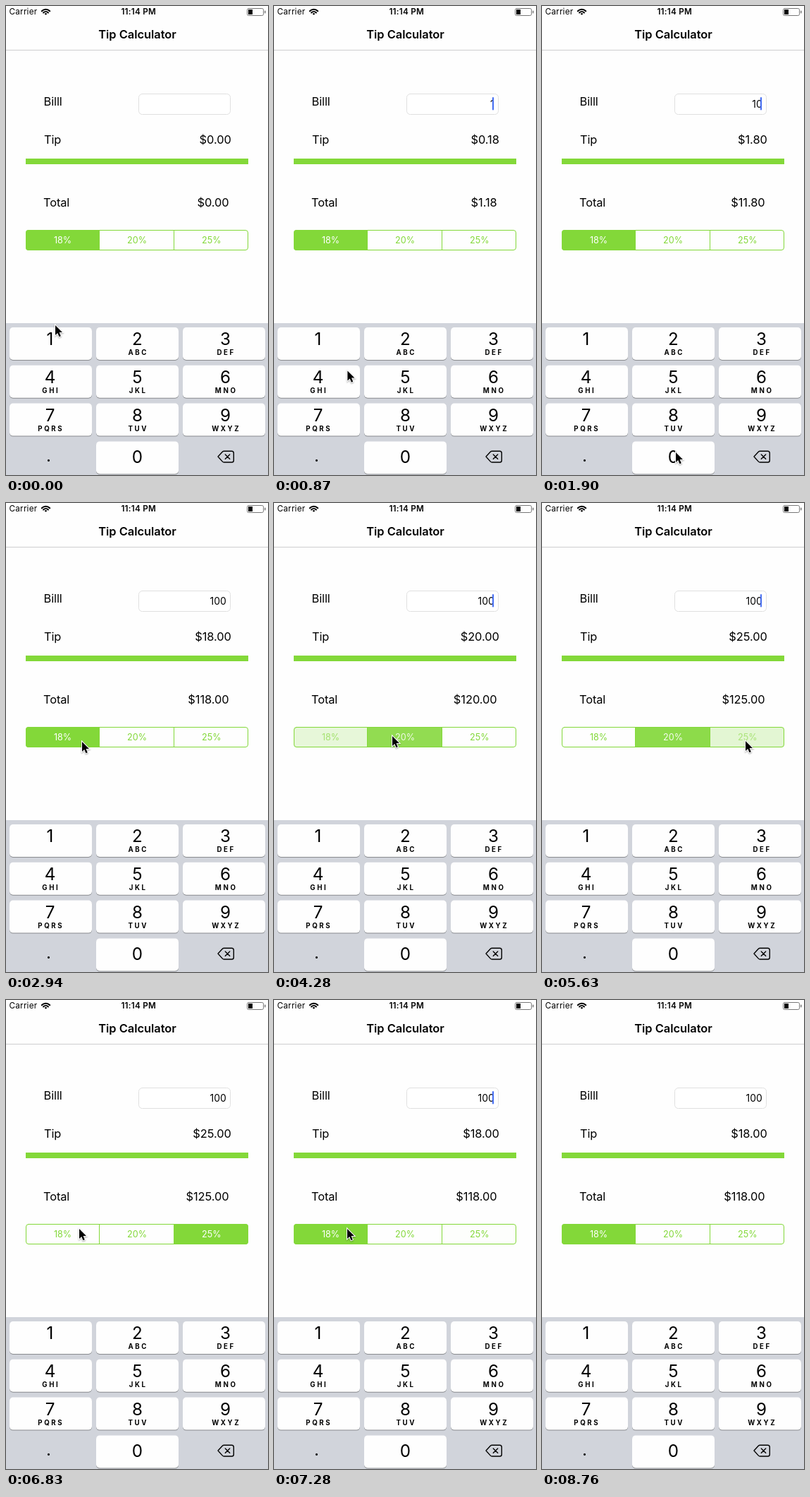
Animation of 372x664 px, one loop 8860 ms. Source, as an HTML page with a canvas:

```html
<!DOCTYPE html>
<html lang="en">
<head>
<meta charset="utf-8">
<title>Tip Calculator</title>
<style>
html, body { margin: 0; width: 100%; height: 100%; overflow: hidden; background: #fefefe; }
canvas { display: block; width: 372px; height: 664px; }
</style>
</head>
<body>
<canvas id="stage"></canvas>
<script>
const W = 372, H = 664, LOOP = 8860;
const GREEN = '#83d839';
const canvas = document.getElementById('stage');
const ctx = canvas.getContext('2d');
const dpr = window.devicePixelRatio || 1;
canvas.width = W * dpr;
canvas.height = H * dpr;

// The screen refreshes in coarse steps.
const STEP = 148.9, LEAD = 45;
const tick = t => Math.max(0, Math.floor((t + LEAD) / STEP) * STEP - LEAD);

const clamp = v => Math.min(1, Math.max(0, v));
const smooth = u => u * u * (3 - 2 * u);

// Pointer stops: time, x, y
const STOPS = [
  [0, 70, 452], [60, 70, 452], [430, 73, 474], [600, 73, 474],
  [1330, 190, 632], [2490, 190, 632], [2930, 108, 338], [3075, 102, 335],
  [3525, 168, 330], [4590, 168, 330], [5320, 289, 337], [5930, 289, 337],
  [6800, 104, 324], [7560, 104, 324], [7995, 128, 481]
];
const POINTER_GONE = 8130;

const TYPED = [[430, '1'], [1740, '10'], [2170, '100']];
const RATES = [18, 20, 25];
const PICKS = [[-1000, 0], [4106, 1], [5572, 2], [7062, 0]];
const PICK_FADE = 190;

function latest(list, t) {
  let i = -1;
  while (i + 1 < list.length && list[i + 1][0] <= t) i++;
  return i;
}

function text(str, x, y, size, o = {}) {
  ctx.font = `${o.weight || 400} ${size}px Inter, "Open Sans", sans-serif`;
  ctx.textAlign = o.align || 'left';
  ctx.letterSpacing = (o.track || 0) + 'px';
  ctx.fillStyle = o.color || '#000';
  ctx.fillText(str, x, y);
}

function rect(x, y, w, h, color) {
  ctx.fillStyle = color;
  ctx.fillRect(x, y, w, h);
}

function round(x, y, w, h, r, fill, stroke) {
  ctx.beginPath();
  ctx.roundRect(x, y, w, h, r);
  if (fill) { ctx.fillStyle = fill; ctx.fill(); }
  if (stroke) { ctx.strokeStyle = stroke; ctx.lineWidth = 1; ctx.stroke(); }
}

function withAlpha(a, draw) {
  if (a <= 0) return;
  ctx.globalAlpha = a;
  draw();
  ctx.globalAlpha = 1;
}

function drawWifi(x, y) {
  const from = -Math.PI * 0.75, to = -Math.PI * 0.25;
  ctx.strokeStyle = ctx.fillStyle = '#000';
  ctx.lineWidth = 2.1;
  for (const r of [8, 4.8]) {
    ctx.beginPath();
    ctx.arc(x, y, r, from, to);
    ctx.stroke();
  }
  ctx.beginPath();
  ctx.moveTo(x, y);
  ctx.arc(x, y, 2.6, from, to);
  ctx.fill();
}

function drawHeader() {
  text('Carrier', 4.6, 12.2, 11.7, { track: 0.2 });
  drawWifi(56.5, 12.8);
  text('11:14 PM', 188.2, 12.2, 11.7, { weight: 600, align: 'center', track: 0.25 });
  round(342.5, 3.5, 23, 10, 2, null, '#777');
  rect(344, 5, 6, 7, '#000');
  round(367, 6.5, 1.5, 4, 0.7, '#777');
  text('Tip Calculator', 186.5, 46, 16.4, { weight: 600, align: 'center' });
  rect(0, 62, W, 1, '#cdcdcf');
}

function caretAlpha(t) {
  if (t < 90) return 0;
  const i = latest(TYPED, t);
  const p = (t - (i < 0 ? 90 : TYPED[i][0] + 20)) % 994;
  if (p > 935) return 1;
  return 1 - clamp((p - 435) / 150);
}

function drawForm(t) {
  const typed = latest(TYPED, t);
  const entry = typed < 0 ? '' : TYPED[typed][1];
  const bill = Number(entry);
  const tip = bill * RATES[PICKS[latest(PICKS, t)][1]] / 100;
  const money = v => '$' + v.toFixed(2);
  const label = { track: -0.1 };
  const amount = { track: -0.05, align: 'right' };

  text('Billl', 53.6, 140.5, 16.4, label);
  text('Tip', 54, 195.3, 16.4, label);
  text('Total', 53, 283.5, 16.4, label);
  round(188.5, 124.5, 130, 29, 5, '#fff', '#e0e0e0');
  text(entry, 312.7, 144, 13.9, { align: 'right' });
  withAlpha(caretAlpha(t), () => round(310, 129, 2, 18.5, 1, '#426bf2'));
  text(money(tip), 319.8, 194.6, 16.4, amount);
  text(money(bill + tip), 316.6, 283.5, 16.4, amount);
  rect(28, 216, 316, 8, GREEN);
}

function drawSegments(t) {
  const i = latest(PICKS, t);
  const u = clamp((t - PICKS[i][0]) / PICK_FADE);
  const fill = [0, 0, 0];
  if (i > 0) fill[PICKS[i - 1][1]] = 1 - u ** 1.6;
  fill[PICKS[i][1]] = u;
  const edges = [28, 132.5, 238.5, 344];

  ctx.save();
  ctx.beginPath();
  ctx.roundRect(28, 317, 316, 29, 4);
  ctx.clip();
  fill.forEach((a, k) =>
    withAlpha(a, () => rect(edges[k], 317, edges[k + 1] - edges[k], 29, GREEN)));
  ctx.restore();

  round(28.5, 317.5, 315, 28, 3.5, null, GREEN);
  rect(132, 317, 1, 29, GREEN);
  rect(238, 317, 1, 29, GREEN);
  fill.forEach((a, k) => {
    const x = [80.6, 186, 291.8][k];
    const put = color => text(RATES[k] + '%', x, 336, 12.6, { align: 'center', color });
    withAlpha(1 - a, () => put(GREEN));
    withAlpha(a, () => put('#fff'));
  });
}

function drawBackspace() {
  ctx.strokeStyle = '#000';
  ctx.lineWidth = 1.4;
  ctx.lineJoin = ctx.lineCap = 'round';
  ctx.beginPath();
  ctx.moveTo(301, 638);
  ctx.lineTo(307.2, 631.2);
  ctx.quadraticCurveTo(308.2, 630.2, 309.6, 630.2);
  ctx.arcTo(323.3, 630.2, 323.3, 633, 2.8);
  ctx.arcTo(323.3, 646, 320, 646, 2.8);
  ctx.lineTo(309.6, 646);
  ctx.quadraticCurveTo(308.2, 646, 307.2, 644.9);
  ctx.closePath();
  ctx.moveTo(311.3, 634.9);
  ctx.lineTo(317.7, 641.3);
  ctx.moveTo(317.7, 634.9);
  ctx.lineTo(311.3, 641.3);
  ctx.stroke();
}

function drawKeyboard() {
  const centers = [62.5, 186.4, 311.4];
  const letters = ['', 'ABC', 'DEF', 'GHI', 'JKL', 'MNO', 'PQRS', 'TUV', 'WXYZ'];
  const key = (col, row) => {
    const x = 5 + col * 123, y = 455 + row * 53.8;
    round(x, y + 1, 117, 46, 5, '#898b8f');
    round(x, y, 117, 46, 5, '#fefefe');
  };
  const digit = (s, x, y) => text(s, x, y, 24.2, { align: 'center' });

  rect(0, 449, W, H - 449, '#d1d4db');
  letters.forEach((s, i) => {
    const col = i % 3, row = Math.floor(i / 3), x = centers[col];
    key(col, row);
    digit(String(i + 1), x, 479.8 + row * 54);
    text(s, x + 1.3, 494.3 + row * 54, 9.7, { weight: 700, align: 'center', track: 2.6 });
  });
  key(1, 3);
  digit('0', centers[1], 647);
  digit('.', 60.4, 645);
  drawBackspace();
}

function drawPointer(t) {
  if (t >= POINTER_GONE) return;
  const i = latest(STOPS, t);
  const [t0, x0, y0] = STOPS[i];
  const [t1, x1, y1] = STOPS[i + 1] || [t0 + 1, x0, y0];
  const u = smooth(clamp((t - t0) / (t1 - t0)));
  ctx.save();
  ctx.translate(x0 + (x1 - x0) * u, y0 + (y1 - y0) * u);
  ctx.beginPath();
  [[0, 0], [0, 14], [3.2, 11], [5.5, 16.3], [7.8, 15.3], [5.6, 10.1], [10, 10.1]]
    .forEach(p => ctx.lineTo(...p));
  ctx.closePath();
  ctx.lineJoin = 'miter';
  ctx.lineWidth = 2;
  ctx.strokeStyle = '#fff';
  ctx.shadowColor = 'rgba(0,0,0,0.35)';
  ctx.shadowBlur = 2 * dpr;
  ctx.shadowOffsetY = dpr;
  ctx.stroke();
  ctx.shadowColor = 'transparent';
  ctx.fillStyle = '#000';
  ctx.fill();
  ctx.restore();
}

function draw(now) {
  const t = tick(now % LOOP);
  ctx.setTransform(dpr, 0, 0, dpr, 0, 0);
  rect(0, 0, W, H, '#fefefe');
  drawHeader();
  drawForm(t);
  drawSegments(t);
  drawKeyboard();
  drawPointer(t);
}

const start = performance.now();
function loop() {
  draw(performance.now() - start);
  requestAnimationFrame(loop);
}
loop();
</script>
</body>
</html>
```
